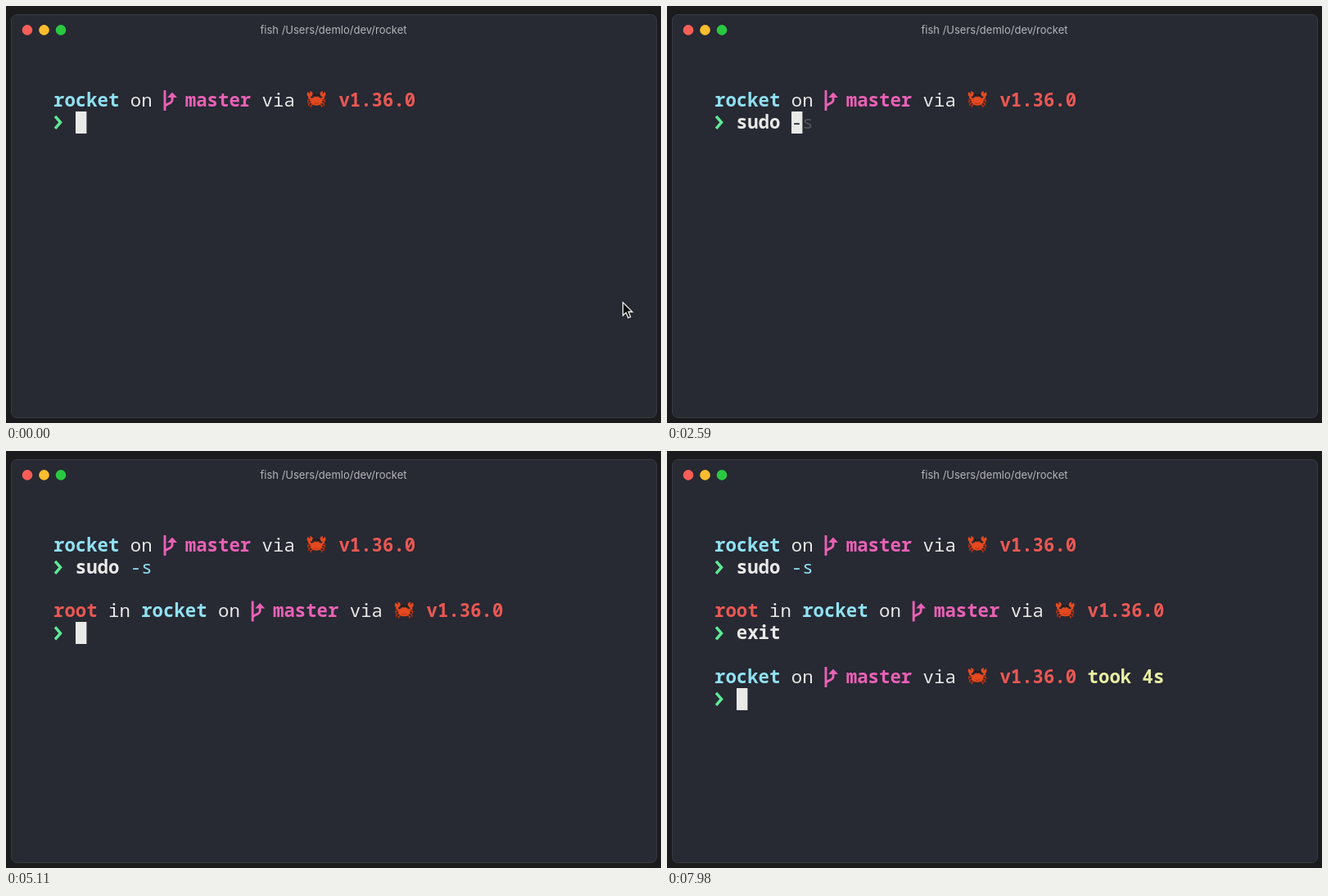
Animation of 800 by 510 pixels, one loop 8 s. Source, as an HTML page with a canvas:

```html
<!DOCTYPE html>
<html lang="en">
<head>
<meta charset="utf-8">
<title>Terminal session</title>
<style>
  html, body { margin: 0; width: 100%; height: 100%; overflow: hidden; background: #1b1b1d; }
  canvas { display: block; width: 800px; height: 510px; }
</style>
</head>
<body>
<canvas width="800" height="510"></canvas>
<script>
const ctx = document.querySelector('canvas').getContext('2d');
const LOOP = 8000;
const CELL = 13.4, LINE = 26.85, LEFT = 58, TOP = 102;
const MONO = '22.33px "Noto Sans Mono", "DejaVu Sans Mono", monospace';
const C = {
  outer: '#1b1b1d', bg: '#272933', edge: '#3a3c45', title: '#b5b6ba',
  fg: '#e9e9e8', cyan: '#90e1f1', pink: '#e961b5', red: '#e95853',
  green: '#5ee995', yellow: '#e9efa2', hint: '#54555c',
  crab: '#e5491f', crabDark: '#b9310f'
};

// Times at which each character of a command has been typed
const SUDO_KEYS = [1750, 2030, 2170, 2310, 2520, 2800, 2940];
const EXIT_KEYS = [5950, 6160, 6300, 6440];
const SUDO_ENTER = 3360, ROOT_READY = 4760;
const EXIT_ENTER = 6860, USER_READY = 7350;
const VALID = ['su', 'sudo', 'ex', 'exit'];

const colX = col => LEFT + col * CELL;
const rowY = row => TOP + row * LINE;

function text(str, col, row, color, bold) {
  ctx.font = (bold ? 'bold ' : '') + MONO;
  ctx.fillStyle = color;
  ctx.textAlign = 'left';
  ctx.fillText(str, colX(col), rowY(row) + 20.9);
}

function shape(d, color, width) {
  const path = new Path2D(d);
  if (width) {
    ctx.lineWidth = width;
    ctx.strokeStyle = color;
    ctx.stroke(path);
  } else {
    ctx.fillStyle = color;
    ctx.fill(path);
  }
}

function at(x, y, draw) {
  ctx.save();
  ctx.translate(x, y);
  draw();
  ctx.restore();
}

function ellipse(x, y, rx, ry, color) {
  ctx.fillStyle = color;
  ctx.beginPath();
  ctx.ellipse(x, y, rx, ry, 0, 0, Math.PI * 2);
  ctx.fill();
}

function branch(col, row) {
  at(colX(col), rowY(row), () => {
    shape('M2 1V26M2 21C3 17 11 18 11 13V8', C.pink, 2.9);
    shape('M5 10L11 3.5L17 10Z', C.pink);
  });
}

function crab(col, row) {
  at(colX(col) + 12.9, rowY(row) + 12, () => {
    for (const side of [1, -1]) {
      ctx.save();
      ctx.scale(side, 1);
      shape('M5 2L10 1L10.5 4M5 4L9 5L9.5 8M4 6L7 8L6.5 10', C.crabDark, 1.6);
      shape('M5 1L9 -2L8 -5', C.crab, 2.2);
      shape('M7 -3C3 -6 4 -9 8 -10L7.5 -6.5L10.5 -9C13 -5 10 -2 7 -3Z', C.crab);
      shape('M2 -2V-5', C.crab, 1.4);
      ellipse(2.1, -5, 1.3, 1.5, '#251512');
      ctx.restore();
    }
    ellipse(0, 2.3, 7.2, 5.4, C.crab);
    shape('M-3 4.5Q0 6.5 3 4.5', C.crabDark, 1);
  });
}

function chevron(row) {
  at(LEFT, rowY(row), () => shape('M2 6L8.5 13.5L2 21', C.green, 3.5));
}

function prompt(row, root, took) {
  let col = 0;
  if (root) {
    text('root', 0, row, C.red, true);
    text('in', 5, row, C.fg);
    col = 8;
  }
  text('rocket', col, row, C.cyan, true);
  text('on', col + 7, row, C.fg);
  branch(col + 10, row);
  text('master', col + 12, row, C.pink, true);
  text('via', col + 19, row, C.fg);
  crab(col + 23, row);
  text('v1.36.0', col + 26, row, C.red, true);
  if (took) text('took 4s', col + 34, row, C.yellow, true);
  chevron(row + 1);
}

function cursor(col, row, letter = '') {
  ctx.fillStyle = C.fg;
  ctx.fillRect(Math.round(colX(col)), Math.round(rowY(row)), 13.4, 27);
  text(letter, col, row, C.bg);
}

function commandLine(full, keys, row, t, entered) {
  const count = keys.filter(k => t >= k).length;
  const [word, arg] = full.slice(0, count).split(' ');
  const valid = VALID.includes(word);
  text(word, 2, row, valid ? C.fg : C.red, valid);
  if (arg) text(arg, 3 + word.length, row, C.cyan);
  if (entered) return;
  if (count) text(full.slice(count + 1), count + 3, row, C.hint);
  cursor(count + 2, row, count ? full[count] : '');
}

function windowFrame(title) {
  ctx.fillStyle = C.outer;
  ctx.fillRect(0, 0, 800, 510);
  ctx.beginPath();
  ctx.roundRect(6.5, 10.5, 788, 493, 7);
  ctx.fillStyle = C.bg;
  ctx.fill();
  ctx.lineWidth = 1;
  ctx.strokeStyle = C.edge;
  ctx.stroke();
  ['#fa5e57', '#fdbd2e', '#29c941'].forEach((c, i) => ellipse(26 + i * 20.5, 29.4, 6.3, 6.3, c));
  ctx.font = '13px Inter, Roboto, sans-serif';
  ctx.textAlign = 'center';
  ctx.fillStyle = C.title;
  ctx.fillText(title + ' /Users/demlo/dev/rocket', 400, 34.4);
}

function pointer(t) {
  const p = Math.min(1, Math.max(0, (t - 1050) / 420));
  if (p === 1) return;
  const ease = p * p * (3 - 2 * p);
  at(753 + 35 * ease, 362 + 150 * ease, () => {
    const arrow = 'M.5 .5V16.5L4.3 13L7 19.3L9.8 18.1L7.2 12H12Z';
    shape(arrow, '#0c0c0e');
    shape(arrow, '#f2f2f2', 1.3);
  });
}

function draw(t) {
  const rootReady = t >= ROOT_READY, userReady = t >= USER_READY;
  const sudoEntered = t >= SUDO_ENTER, exitEntered = t >= EXIT_ENTER;
  windowFrame(sudoEntered && !rootReady ? 'sudo' : 'fish');
  prompt(0);
  commandLine('sudo -s', SUDO_KEYS, 1, t, sudoEntered);
  if (sudoEntered && !rootReady) cursor(0, 2);
  if (rootReady) {
    prompt(3, true);
    commandLine('exit', EXIT_KEYS, 4, t, exitEntered);
  }
  if (exitEntered && !userReady) cursor(0, 5);
  if (userReady) {
    prompt(6, false, true);
    cursor(2, 7);
  }
  pointer(t);
}

const start = performance.now();
function tick() {
  draw((performance.now() - start) % LOOP);
  requestAnimationFrame(tick);
}
tick();
</script>
</body>
</html>
```
